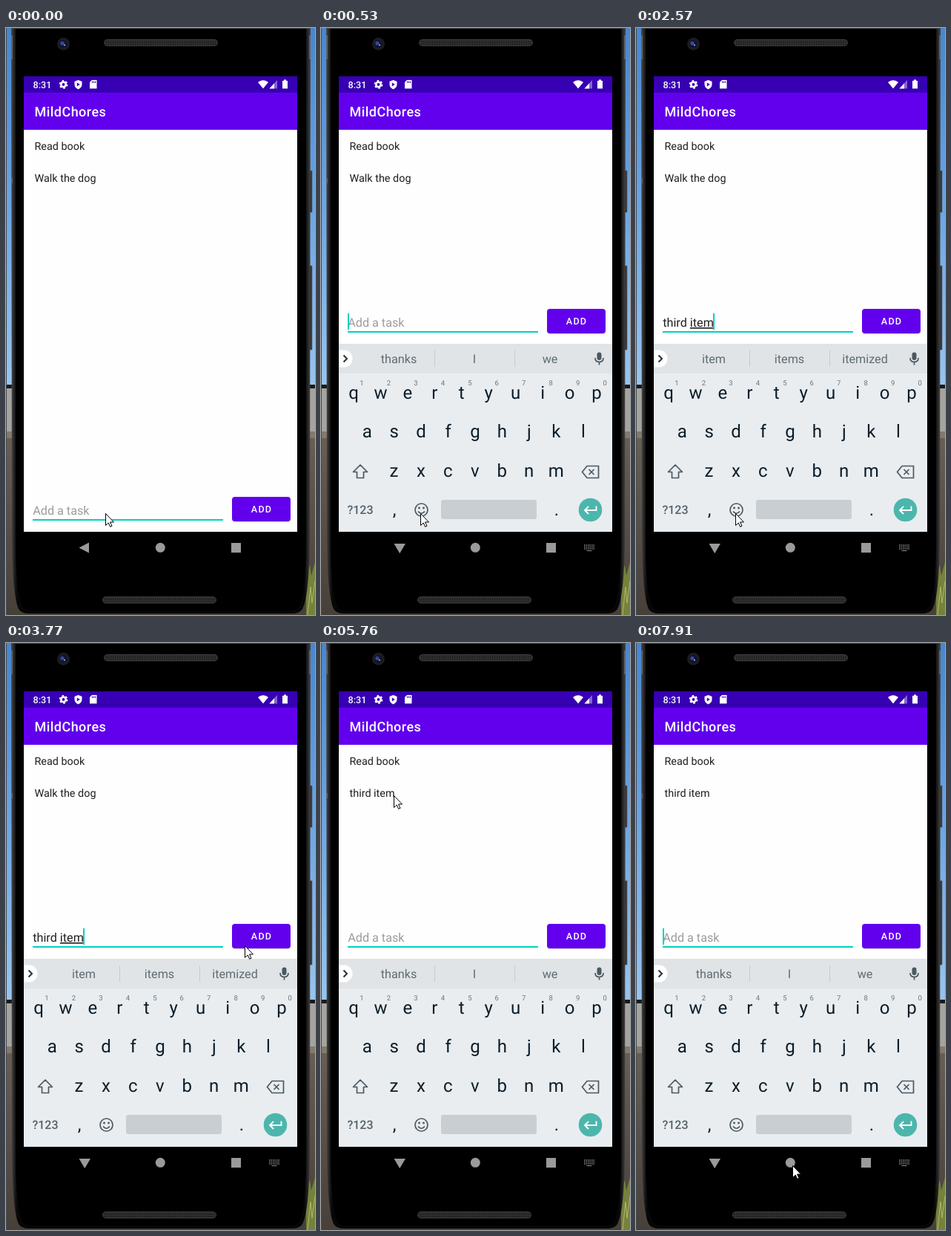
An HTML page for the animation above (8000 ms loop, 417 px wide and 790 px high).

```html
<!DOCTYPE html>
<html lang="en">
<head>
<meta charset="utf-8">
<title>To-do list demo</title>
<style>
  html, body { margin: 0; width: 100%; height: 100%; overflow: hidden; background: #000; }
  svg { display: block; width: 417px; height: 790px; font-family: Roboto, sans-serif; }
  text { white-space: pre; text-rendering: geometricPrecision; }
  .mid { text-anchor: middle; }
  .item { font-size: 14.4px; fill: #1f1f1f; }
  .key { font-size: 24px; fill: #0c1d29; }
  .digit { font-size: 9.5px; fill: #68757d; }
  .hint { font-size: 16.2px; fill: #5f6b72; }
  .line { fill: none; stroke: #4b5860; stroke-width: 1.7; }
</style>
</head>
<body>
<svg viewBox="0 0 417 790">
  <defs>
    <linearGradient id="sky" x2="0" y2="1">
      <stop offset="0" stop-color="#4786cf"/>
      <stop offset=".5" stop-color="#6ca5e3"/>
      <stop offset="1" stop-color="#98c5ee"/>
    </linearGradient>
    <linearGradient id="wall" x2="0" y2="1">
      <stop offset="0" stop-color="#675e54"/>
      <stop offset="1" stop-color="#474039"/>
    </linearGradient>
    <linearGradient id="rim">
      <stop offset="0" stop-color="#4a4a4b"/>
      <stop offset=".012" stop-color="#1c1c1d"/>
      <stop offset=".02" stop-color="#070707"/>
      <stop offset=".98" stop-color="#070707"/>
      <stop offset=".988" stop-color="#1c1c1d"/>
      <stop offset="1" stop-color="#454546"/>
    </linearGradient>
    <pattern id="mesh" width="3" height="3" patternUnits="userSpaceOnUse">
      <rect width="3" height="3" fill="#303030"/>
      <rect width="1.5" height="1.5" fill="#151515"/>
    </pattern>
    <clipPath id="screen"><rect x="24" y="65" width="369" height="613"/></clipPath>
  </defs>

  <!-- backdrop and phone body -->
  <rect width="417" height="481" fill="url(#sky)"/>
  <rect y="480" width="417" height="5" fill="#191a1b"/>
  <rect y="485" width="417" height="60" fill="#a5a49f"/>
  <rect y="543" width="417" height="9" fill="#837a6c"/>
  <rect y="552" width="417" height="238" fill="url(#wall)"/>
  <path d="M405 790V735l5-12 2 14 5-18v71z" fill="#75823c"/>
  <path d="M407 790l4-38 2 22 4-30" fill="none" stroke="#b3b766"/>
  <path d="M.5 0V790" stroke="#454b52"/>
  <path d="M409 192h4v56h-4zM409 320h4v113h-4z" fill="#343436" stroke="#5a5a5c" stroke-width=".7"/>
  <path d="M7 0H411L410 690Q409 765 400 782Q396 788 386 788H31Q21 788 17 782Q9 765 8 690Z" fill="url(#rim)"/>
  <path d="M13 0H405V700Q404 760 396 778Q393 784 384 784H34Q25 784 22 778Q14 760 13 700Z"/>
  <path d="M8 .5H410" stroke="#484848"/>
  <path d="M8 10V42M410 10V42M8 202V209" stroke="#606062" stroke-width="2"/>
  <g fill="url(#mesh)" stroke="#444" stroke-width=".8">
    <rect x="132.500" y="15.500" width="153" height="8.500" rx="4.200"/>
    <rect x="130.500" y="765.500" width="153" height="8.500" rx="4.200"/>
  </g>
  <circle cx="77.500" cy="21.500" r="8.500" fill="#1c1c20"/>
  <circle cx="77.500" cy="21.500" r="5" fill="#101430"/>
  <circle cx="76" cy="20.500" r="2.600" fill="#3348a0"/>
  <circle cx="79" cy="23" r="1.100" fill="#9eaaf0"/>

  <g clip-path="url(#screen)">
    <rect x="24" y="65" width="369" height="613" fill="#fefefe"/>
    <rect x="24" y="65" width="369" height="22" fill="#3700b3"/>
    <rect x="24" y="87" width="369" height="50" fill="#6200ee"/>
    <g fill="#fff">
      <text x="36.500" y="80.500" font-size="12.600" font-weight="500">8:31</text>
      <text x="38.500" y="118.500" font-size="18" font-weight="500" letter-spacing=".45">MildChores</text>
      <circle cx="77.500" cy="76" r="3.200" fill="none" stroke="#fff" stroke-width="2.600"/>
      <circle cx="77.500" cy="76" r="5" fill="none" stroke="#fff" stroke-width="1.800" stroke-dasharray="2.600 2.636"/>
      <path d="M97.500 70l5 2v4q0 4-5 6.500q-5-2.500-5-6.500v-4z"/>
      <path d="M95.800 73.500v5l4-2.500z" fill="#3700b3"/>
      <path d="M116 70h6.500v11.500h-9.500v-8.500z"/>
      <path d="M116.500 71.500v2.500m2-2.500v2.500m2-2.500v2.500" stroke="#3700b3"/>
      <path d="M340 73q7-5.500 14 0l-7 8.500z"/>
      <path d="M366 70v11.500h-10.500z" opacity=".4"/>
      <path d="M362 74.400v7.100h-6.500z"/>
      <path d="M375 69.500h3v1.500h2v10.500h-7v-10.500h2z"/>
    </g>
    <g id="list"></g>

    <g id="form">
      <text id="field" x="36.200" y="402" font-size="16.200"><tspan id="done"></tspan><tspan id="draft" text-decoration="underline"></tspan></text>
      <rect x="36" y="408" width="257" height="2" fill="#03d0c0"/>
      <rect id="caret" y="384" width="2" height="22" fill="#03d0c0"/>
      <rect x="305" y="379.500" width="79" height="32.500" rx="4" fill="#000" opacity=".16"/>
      <rect id="button" x="305" y="378" width="79" height="33" rx="4"/>
      <text class="mid" x="345" y="399" font-size="12.600" font-weight="500" letter-spacing="1.150" fill="#fff">ADD</text>
    </g>

    <g id="board">
      <rect x="24" y="425" width="369" height="253" fill="#e9edf0"/>
      <rect x="24" y="425" width="369" height="40" fill="#e0e4e7"/>
      <path d="M153.500 434v22M261.500 434v22" stroke="#c5cbcf"/>
      <path d="M24 433.500h7a11.500 11.500 0 0 1 0 23h-7z" fill="#fff"/>
      <path d="M30.500 440.500l4.500 4.500-4.500 4.500" class="line" style="stroke:#26323a;stroke-width:2"/>
      <g id="words"></g>
      <rect x="372.500" y="436.500" width="6" height="10.500" rx="3" fill="#4b5860"/>
      <path d="M370 444q0 5.500 5.500 5.500t5.500-5.500M375.500 449.500v4" class="line"/>
      <g id="keys"></g>
      <path d="M53 588l9.500 9.500h-5v8h-9v-8h-5z" class="line" stroke-linejoin="round"/>
      <path d="M359 589.500h15.500v16h-15.500l-6.500-8zM361.500 594l7 7m0-7l-7 7" class="line"/>
      <text class="mid" x="53" y="654" font-size="16" font-weight="500" fill="#55626a">?123</text>
      <circle cx="135.500" cy="648.500" r="8.500" class="line"/>
      <path d="M131 650.500q4.500 5.500 9 0" class="line"/>
      <circle cx="132.500" cy="646" r="1.400" fill="#4b5860"/>
      <circle cx="138.500" cy="646" r="1.400" fill="#4b5860"/>
      <rect x="162" y="635" width="129" height="26" rx="3" fill="#c9ced2"/>
      <circle cx="363.500" cy="648.500" r="15.800" fill="#4db6ac"/>
      <path d="M371.500 643.500v5.500h-15m4.500-5l-5 5 5 5" fill="none" stroke="#fff" stroke-width="1.900"/>
    </g>
  </g>

  <!-- navigation bar -->
  <g fill="#9a9a9a">
    <path id="back"/>
    <circle cx="208.300" cy="699.300" r="6.500"/>
    <rect x="304" y="693" width="13" height="13"/>
    <g id="dots" stroke="#8c8c8c" stroke-width="1.300">
      <path d="M355 696h14M355 698.500h14M355 701h14" stroke-dasharray="1.400 1.100"/>
      <path d="M358.500 703.500h7" stroke-width="1"/>
    </g>
  </g>

  <path id="mouse" d="M.5.500V16.500L4.200 13 6.700 18.300 9 17.200 6.500 12H11.500Z" fill="#fff" stroke="#000" stroke-linejoin="round"/>
</svg>

<script>
const LOOP = 8000;
const $ = id => document.getElementById(id);

// Each row: time, then the values held until the next row.
const mouseSteps = [
  [0, 134, 653], [3100, 176, 606], [3240, 296, 490], [3370, 382, 428],
  [3500, 350, 412], [3770, 322, 407], [4440, 300, 392], [4570, 235, 338],
  [4690, 160, 218], [4820, 112, 133], [4950, 100, 180], [5080, 98, 205],
  [6140, 160, 320], [6260, 290, 470], [6380, 380, 575], [6510, 397, 610],
  [6630, 384, 668], [6760, 338, 722], [6880, 280, 744], [7010, 243, 730],
  [7140, 224, 714], [7260, 213, 705], [7640, 213, 702], [7760, 211, 703]
];
// Committed text, word being composed, suggestions.
const typing = [
  [0, "", "", "thanks I we"],
  [670, "", "t", "the to that"],
  [800, "", "th", "the that this"],
  [930, "", "thi", "think thing this"],
  [1200, "", "third", "third thirds 3rd"],
  [1350, "third ", "", "party time one"],
  [2150, "third ", "i", "is in I"],
  [2270, "third ", "it", "it its it's"],
  [2400, "third ", "ite", "item items iter"],
  [2570, "third ", "item", "item items itemized"],
  [4170, "", "", "thanks I we"]
];
const lists = [
  [0, "Read book", "Walk the dog"],
  [4170, "Read book", "Walk the dog", "third item"],
  [5760, "Read book", "third item"]
];
const caretSteps = [
  [0, 0], [530, 1], [1750, 0], [2000, 1], [2970, 0], [3500, 1], [3900, 0],
  [4170, 1], [4440, 0], [5080, 1], [5510, 0], [6010, 1], [6510, 0],
  [7010, 1], [7510, 0], [7910, 1]
];
// Form offset, keyboard offset.
const panelSteps = [[0, 253, 253], [260, 253, 150], [400, 0, 30], [530, 0, 0]];
const buttonSteps = [[0, "#6200ee"], [4170, "#7f31f1"], [4300, "#6e16ef"], [4440, "#6200ee"]];

const at = (steps, t) => steps.findLast(s => s[0] <= t).slice(1);

function label(parent, cls, x, y, str = "") {
  const el = document.createElementNS("http://www.w3.org/2000/svg", "text");
  el.setAttribute("class", cls);
  el.setAttribute("x", x);
  el.setAttribute("y", y);
  el.textContent = str;
  return parent.appendChild(el);
}

const PITCH = 36.45;
[["qwertyuiop", 44, 499], ["asdfghjkl", 62.2, 551], ["zxcvbnm", 98.5, 604]].forEach(([row, x, y]) =>
  [...row].forEach((c, i) => label($("keys"), "mid key", x + i * PITCH, y, c)));
[..."1234567890"].forEach((c, i) => label($("keys"), "mid digit", 55 + i * PITCH, 481, c));
label($("keys"), "mid key", 99, 656, ",");
label($("keys"), "mid key", 318, 656, ".");

const rows = [164, 207, 250].map(y => label($("list"), "item", 38.5, y));
const words = [105, 207, 309].map(x => label($("words"), "mid hint", x, 451));
const pen = document.createElement("canvas").getContext("2d");
pen.font = "16.2px Roboto, sans-serif";
pen.textRendering = "geometricPrecision";

const shift = (id, x, y) => $(id).setAttribute("transform", `translate(${x} ${y})`);
const set = (el, str) => { if (el.textContent !== str) el.textContent = str; };

function draw(t) {
  const [done, draft, hints] = at(typing, t);
  const text = done + draft;
  set($("done"), text ? done : "Add a task");
  set($("draft"), draft);
  $("field").setAttribute("fill", text ? "#1f1f1f" : "#9b9b9b");
  hints.split(" ").forEach((w, i) => set(words[i], w));

  const items = at(lists, t);
  rows.forEach((r, i) => set(r, items[i] || ""));

  $("caret").setAttribute("x", 36 + Math.floor(pen.measureText(text).width));
  $("caret").setAttribute("opacity", at(caretSteps, t)[0]);
  $("button").setAttribute("fill", at(buttonSteps, t)[0]);

  const [formY, boardY] = at(panelSteps, t);
  const open = boardY < 253;
  shift("form", 0, formY);
  shift("board", 0, boardY);
  $("dots").setAttribute("opacity", open ? 1 : 0);
  $("back").setAttribute("d", open ? "M98.500 694h15.500l-7.750 13z" : "M112 692.500v14l-13.500-7z");

  shift("mouse", ...at(mouseSteps, t));
}

const start = performance.now();
function tick() {
  draw((performance.now() - start) % LOOP);
  requestAnimationFrame(tick);
}
tick();
</script>
</body>
</html>
```
